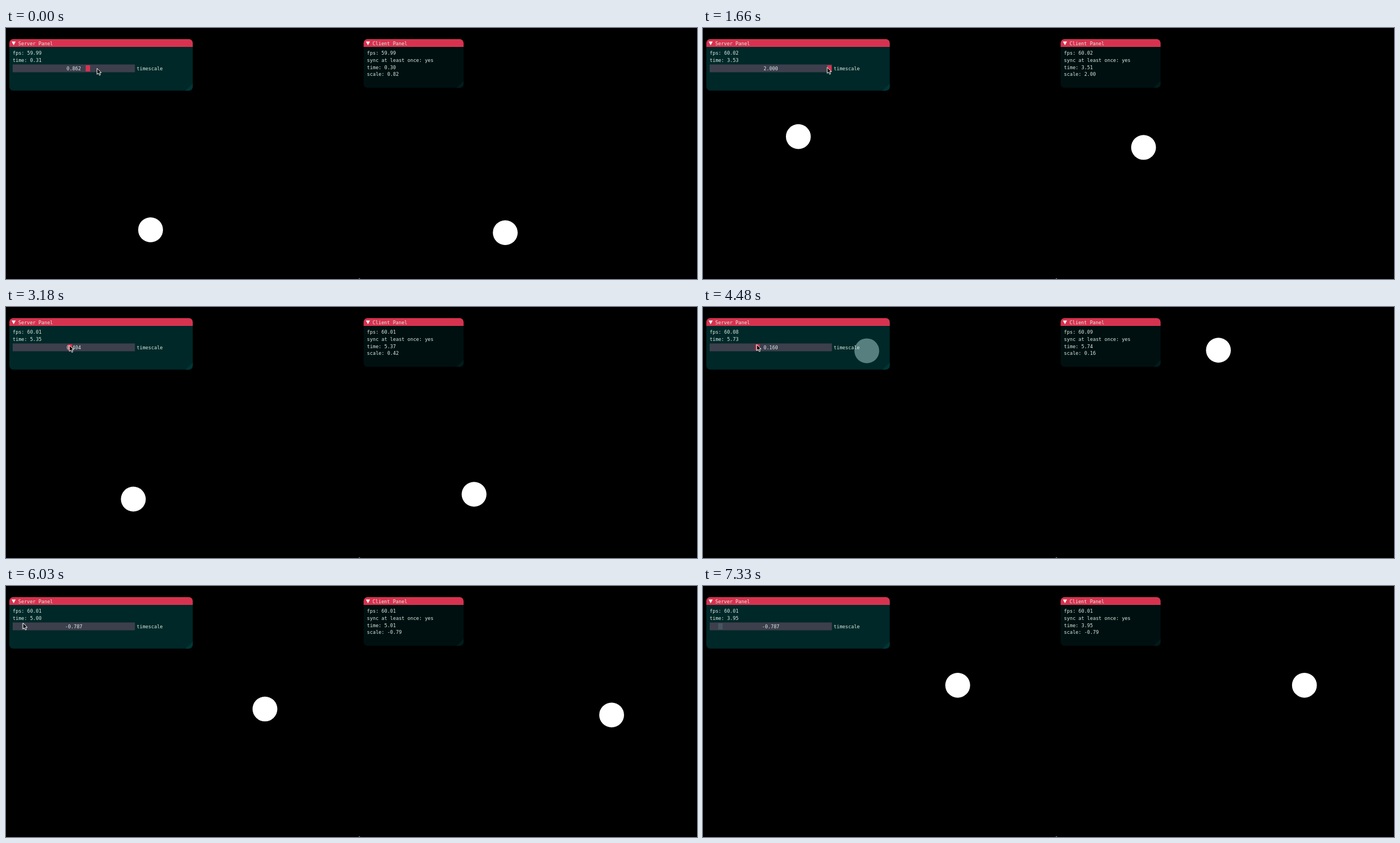
These frames come from a looping animation (1241 px wide and 451 px high, 7430 ms). An HTML page:

```html
<!DOCTYPE html>
<html lang="en">
<head>
<meta charset="utf-8">
<title>Time sync</title>
<style>
  html, body { margin: 0; width: 100%; height: 100%; overflow: hidden; background: #000; }
  svg { display: block; width: 100%; height: 100%; }
  text { font: 8.64px "DejaVu Sans Mono", "Liberation Mono", monospace; fill: #dbede3; white-space: pre; }
  .title { fill: #d7324f; }
  .arrow { fill: #eef3ee; }
</style>
</head>
<body>
<svg viewBox="0 0 1241 451">
  <rect width="1241" height="451"/>
  <circle id="serverBall" r="22.3" fill="#fff"/>
  <circle id="clientBall" r="22.3" fill="#fff"/>
  <rect x="633.5" y="450" width="2.5" height="1" fill="#999"/>

  <g>
    <rect x="6" y="20" width="329.4" height="92.5" rx="7" fill="rgb(0 61 61 / .66)"/>
    <path class="title" d="M6 34V27a7 7 0 0 1 7-7H328.400a7 7 0 0 1 7 7V34Z"/>
    <path d="M335.400 100V105.500a7 7 0 0 1-7 7H322Z" fill="#003636"/>
    <path class="arrow" d="M10 24.300H17.500L13.750 31Z"/>
    <text x="22" y="30.5">Server Panel</text>
    <text id="serverFps" x="12" y="48.3"></text>
    <text id="serverTime" x="12" y="61"></text>
    <rect x="12" y="65.5" width="219.5" height="14" fill="#3d3f4d"/>
    <rect id="grab" y="67" width="8" height="11"/>
    <text id="value" x="121.7" y="75.8" text-anchor="middle"></text>
    <text x="234.8" y="75.8">timescale</text>
  </g>

  <g transform="translate(636.3)">
    <rect x="6" y="20" width="179.5" height="87.5" rx="7" fill="rgb(0 24 24 / .7)"/>
    <path class="title" d="M6 34V27a7 7 0 0 1 7-7H178.500a7 7 0 0 1 7 7V34Z"/>
    <path d="M185.500 95V100.500a7 7 0 0 1-7 7H173Z" fill="#001b1b"/>
    <path class="arrow" d="M10 24.300H17.500L13.750 31Z"/>
    <text x="22" y="30.5">Client Panel</text>
    <text id="clientFps" x="12" y="48.3"></text>
    <text x="12" y="61">sync at least once: yes</text>
    <text id="clientTime" x="12" y="73.7"></text>
    <text id="clientScale" x="12" y="86.3"></text>
  </g>

  <path id="cursor" d="M.5.5V11.300L3 9L4.900 13L6.700 12.200L5 8.300H8.200Z" fill="#000" stroke="#fff"/>
</svg>
<script>
const LOOP = 7430, STEP_MS = 118, LEAD_MS = 8;
const STEP = 0.1209;        // simulated seconds per screen refresh
const START_TIME = 0.2273;  // server time at the first scale key
const SYNC_DELAY = 0.13;    // in refreshes, like every key below
const RELEASE = 51;

// The slider drag: up to full speed, down to slow motion, then into reverse
const scaleKeys = [[-1, .55], [0, .862], [2.4, 2], [15, 2], [22, .838],
  [27, .404], [38, .16], [42, .05], [43.48, -.787], [62, -.787]];
// Client clock error in seconds
const driftKeys = [[0, -.0163], [14, -.021], [27, .0148], [38, .0095], [46, .0167], [62, 0]];
// The pointer leaves the slider, rests, and drops off the bottom
const exitX = [[RELEASE, 30], [56, 1183], [57, 1183], [58, 1176]];
const exitY = [[RELEASE, 66], [56, 396], [57, 396], [58, 452]];

const $ = id => document.getElementById(id);
const set = (id, attrs) => {
  for (const name in attrs) $(id).setAttribute(name, attrs[name]);
};

function lerp(keys, n) {
  const i = keys.findIndex(([at]) => at > n);
  if (i < 0) return keys.at(-1)[1];
  if (i === 0) return keys[0][1];
  const [[n0, v0], [n1, v1]] = [keys[i - 1], keys[i]];
  return v0 + (v1 - v0) * (n - n0) / (n1 - n0);
}

const scaleAt = n => lerp(scaleKeys, n);
const sliderX = scale => 16.4 + (scale + 1) * 70.2;

// Server time is the area under the scale curve
function serverTime(n) {
  let area = 0;
  for (let i = 1; i < scaleKeys.length; i++) {
    const from = scaleKeys[i - 1][0], to = Math.min(scaleKeys[i][0], n);
    if (to > from) area += (to - from) * (scaleAt(from) + scaleAt(to)) / 2;
  }
  return START_TIME + area * STEP;
}

// A settling wobble and one spike
const fps = (n, spike) => 60.01
  - .02 * Math.exp(-n / 30) * Math.cos(.17 * n)
  + spike * Math.exp(-(((n - 38) / 4) ** 2));

function pointer(n) {
  if (n >= RELEASE) return [lerp(exitX, n), lerp(exitY, n)];
  return [Math.min(sliderX(scaleAt(n + .5)) - .8, 222.5), 72 - .13 * n];
}

// One turn per simulated second
function moveBall(id, centerX, time) {
  const angle = time * 2 * Math.PI;
  set(id, { cx: centerX + 148.5 * Math.cos(angle), cy: 225.5 + 148.5 * Math.sin(angle) });
}

function draw(n) {
  const scale = scaleAt(n);
  const server = serverTime(n);
  const client = server + lerp(driftKeys, n);

  moveBall('serverBall', 316.6, server);
  moveBall('clientBall', 939.3, client);
  set('grab', { x: sliderX(scale) - 4, fill: n < RELEASE ? '#d7324f' : '#455762' });
  set('cursor', { transform: `translate(${pointer(n)})` });

  $('serverFps').textContent = `fps: ${fps(n, .074).toFixed(2)}`;
  $('clientFps').textContent = `fps: ${fps(n, .084).toFixed(2)}`;
  $('serverTime').textContent = `time: ${server.toFixed(2)}`;
  $('clientTime').textContent = `time: ${client.toFixed(2)}`;
  $('value').textContent = scale.toFixed(3);
  $('clientScale').textContent = `scale: ${scaleAt(n - SYNC_DELAY).toFixed(2)}`;
}

const start = performance.now();
function tick() {
  const t = (performance.now() - start) % LOOP;
  draw(Math.floor((t + LEAD_MS) / STEP_MS));
  requestAnimationFrame(tick);
}
tick();
</script>
</body>
</html>
```
